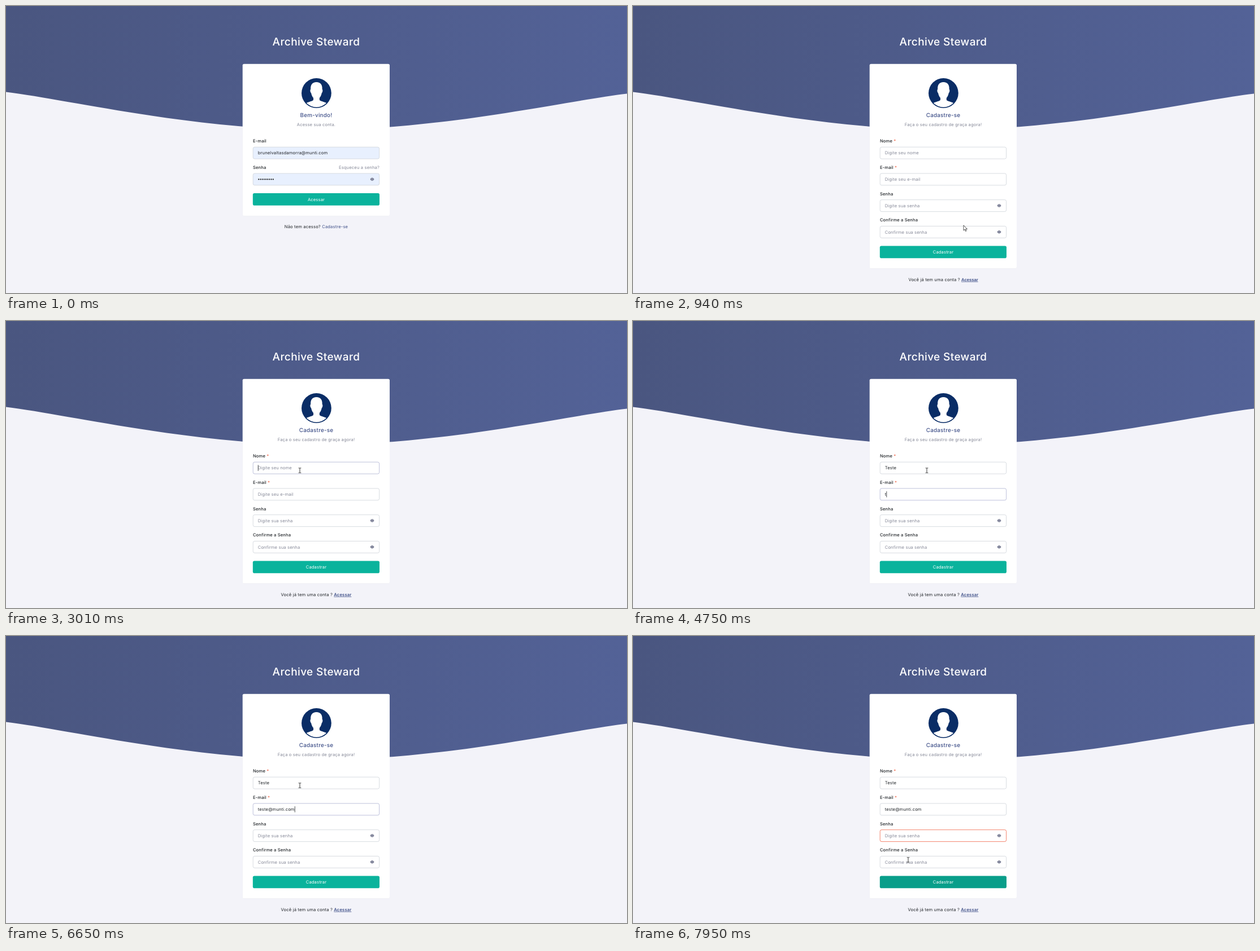
These frames come from a looping animation (1099x509 px, 8000 ms). An HTML page:

```html
<!DOCTYPE html>
<html lang="pt-BR">
<head>
<meta charset="utf-8">
<title>Cadastro</title>
<style>
  html, body { margin: 0; width: 100%; height: 100%; overflow: hidden; background: #f3f3f9; }
  svg { display: block; width: 1099px; height: 509px; }
  text {
    font: 400 7.6px Inter, "Open Sans", sans-serif;
    letter-spacing: .02em;
    text-rendering: geometricPrecision;
    fill: #212529;
    white-space: pre;
  }
  .mid { text-anchor: middle; }
  .end { text-anchor: end; }
  .brand { font-size: 19px; font-weight: 500; fill: #fff; }
  .heading { font-size: 9.9px; font-weight: 500; fill: #405189; }
  .muted { fill: #878a99; }
  .label { font-weight: 500; }
  .star { fill: #f06548; }
  .light { fill: #fff; }
  .link { fill: #405189; }
  .strong { font-weight: 600; text-decoration: underline; }
  .fallback { font-family: "Liberation Sans", Arial, sans-serif; font-weight: 700; letter-spacing: 0; }
  .card { fill: #fff; filter: drop-shadow(0 .8px .7px rgba(56, 65, 74, .15)); }
  .field { fill: #fff; stroke: #ced4da; stroke-width: .8; }
  .filled { fill: #e8f0fe; }
  .button { fill: #0ab39c; }
</style>
</head>
<body>
<svg viewBox="0 0 1099 509">
  <defs>
    <linearGradient id="sky">
      <stop offset="0" stop-color="#4a5680"/>
      <stop offset="1" stop-color="#536297"/>
    </linearGradient>
    <g id="eye">
      <path d="M-3.4 0C-2.4-1.9-1.2-2.7 0-2.7S2.4-1.9 3.4 0C2.4 1.9 1.2 2.7 0 2.7S-2.4 1.9-3.4 0Z" fill="#5b607c"/>
      <circle r="1.55" fill="none" stroke="#fff" stroke-width=".55"/>
    </g>
  </defs>

  <rect width="1099" height="217" fill="url(#sky)"/>
  <path transform="translate(0 125) scale(.7632)" fill="#f3f3f9"
    d="M0 36C144 53.6 432 123.2 720 124C1008 124.8 1296 56.8 1440 40V140H0Z"/>
  <text class="brand mid" x="549" y="70.3">Archive Steward</text>
  <rect id="card" class="card" x="418.7" y="102.7" width="260.3" height="269.5" rx="2.6"/>

  <g transform="translate(549.4 154.5)">
    <circle r="26.4" fill="#0a2d66"/>
    <path fill="#fff" d="M0-19.5C7.5-19.5 10.6-14.5 10.2-7C11.6-5.5 11 -1.5 9.3 0C8.6 4 7 6.8 5.4 8.5V12C7 14.6 13.5 15.2 17.7 17.6
      A25 25 0 0 1-17.7 17.6C-13.5 15.2-7 14.6-5.4 12V8.5C-7 6.8-8.6 4-9.3 0C-11-1.5-11.6-5.5-10.2-7C-10.6-14.5-7.5-19.5 0-19.5Z"/>
  </g>

  <g id="login"></g>
  <g id="signup"></g>
  <rect id="caret" width=".8" height="10.6" fill="#212529"/>

  <g id="pointer">
    <path id="arrow" d="M0 0V9.3L2.1 7.3L3.6 10.7L5 10.1L3.6 6.8H6.5Z" fill="#fff" stroke="#111" stroke-width=".7"/>
    <path id="beam" d="M-2.3-4.2H-.6L0-3.8L.6-4.2H2.3M0-3.8V3.8M-2.3 4.2H-.6L0 3.8L.6 4.2H2.3" fill="none" stroke="#222" stroke-width=".9"/>
    <path id="hand" d="M-1 .8C-1-.4 .9-.4 .9 .8V4.3C1.5 3.7 2.6 3.9 2.7 4.8C3.3 4.3 4.3 4.6 4.4 5.4C5.1 5 6 5.5 6 6.3V9.4C6 11 5.2 11.8 5 13.4H-.4C-.7 11.5-2.5 9.9-3.4 8C-3.7 7-2.6 6.5-1.9 7.3L-1 8.4Z"
      fill="#fff" stroke="#111" stroke-width=".8" stroke-linejoin="round"/>
  </g>
</svg>

<script>
const $ = id => document.getElementById(id);
const ROW = 46.75, LEFT = 437.2, WIDTH = 223.4;
const MAIL = 'teste@munti.com';

const text = (x, y, cls, body, id = '') => `<text ${id && `id="${id}"`} x="${x}" y="${y}" class="${cls}">${body}</text>`;
const required = name => `${name} <tspan class="star">*</tspan>`;
const eye = row => `<use href="#eye" x="648" y="${307.2 + ROW * (row - 1)}"/>`;

function field(row, label, body, { id = '', cls = '', tone = 'muted' } = {}) {
  const y = ROW * row;
  return text(LEFT - .3, 242 + y, 'label', label)
    + `<rect ${id && `id="${id}Box"`} class="field ${cls}" x="${LEFT}" y="${250.2 + y}" width="${WIDTH}" height="20.9" rx="2.8"/>`
    + text(445.7, 263.3 + y, tone, body, id);
}
const heading = (title, note) => text(549, 197, 'heading mid', title) + text(549, 212.6, 'muted mid', note);
const button = (y, label, id) =>
  `<rect id="${id}" class="button" x="436.8" y="${y}" width="224.2" height="21.8" rx="2.8"/>` + text(549, y + 13.6, 'light mid', label);

const dots = Array.from({ length: 9 }, (_, i) => `<circle cx="${447.2 + 3.2 * i}" cy="307.4" r="1.05" fill="#111"/>`).join('');

$('login').innerHTML = heading('Bem-vindo!', 'Acesse sua conta.')
  + field(0, 'E-mail', 'brunelvaltasdamorra@munti.com', { cls: 'filled', tone: '' })
  + field(1, 'Senha', '', { cls: 'filled' }) + dots + eye(1)
  + text(661, 288.7, 'muted end', 'Esqueceu a senha?')
  + button(331.9, 'Acessar', 'enter')
  + text(549, 394.4, 'mid', 'Não tem acesso? <tspan class="link">Cadastre-se</tspan>');

$('signup').innerHTML = heading('Cadastre-se', 'Faça o seu cadastro de graça agora!')
  + field(0, required('Nome'), '', { id: 'name' })
  + field(1, required('E-mail'), '', { id: 'mail' })
  + field(2, 'Senha', 'Digite sua senha', { id: 'pass' }) + eye(2)
  + field(3, 'Confirme a Senha', 'Confirme sua senha') + eye(3)
  + button(425.4, 'Cadastrar', 'send')
  + text(549, 487.7, 'mid', 'Você já tem uma conta ? <tspan id="back" class="link strong">Acessar</tspan>');

const nameKeys = [3090, 3420, 3550, 3680, 3820];
const mailKeys = [4750, 4880, 5010, 5140, 5270, 5470, 5740, 5840, 5930, 6060, 6130, 6330, 6440, 6540, 6650];

// time, x, y
const path = [
  [70, 1000, 491], [330, 800, 436], [600, 622, 394], [730, 586, 384], [870, 585, 389],
  [1270, 585, 388], [1540, 548, 322], [1820, 520, 265],
  [7080, 520, 265], [7180, 517, 272], [7350, 497, 356], [7550, 486, 431],
  [7680, 486, 438], [7820, 487, 432], [7880, 487, 425], [7950, 487, 393]
];

const clamp = v => Math.min(1, Math.max(0, v));
const ramp = (t, from, to) => clamp((t - from) / (to - from));
const mix = (a, b, k) => `rgb(${a.map((v, i) => Math.round(v + (b[i] - v) * k))})`;
const typed = (word, keys, t) => word.slice(0, keys.filter(k => k <= t).length);
const show = (node, on) => { node.style.display = on ? '' : 'none'; };

function pointerAt(t) {
  const next = path.findIndex(p => p[0] > t);
  if (next < 0) return path.at(-1).slice(1);
  const a = path[Math.max(0, next - 1)], b = path[next];
  const k = ramp(t, a[0], b[0]);
  return [a[1] + (b[1] - a[1]) * k, a[2] + (b[2] - a[2]) * k];
}

function pointerKind(x, y, signup) {
  if (!signup) return x > 558 && x < 606 && y > 385 && y < 398 ? 'hand' : 'arrow';
  if (x < 437 || x > 661) return 'arrow';
  if (y >= 425 && y < 447) return 'hand';
  const offset = y - 250;
  return y < 412 && offset >= 0 && offset % ROW < 21.3 ? 'beam' : 'arrow';
}

function drawPointer(t, signup) {
  const [x, y] = pointerAt(Math.floor((t + 6) / 67.3) * 67.3);
  const kind = pointerKind(x, y, signup);
  show($('pointer'), t >= 70);
  $('pointer').setAttribute('transform', `translate(${x} ${y})`);
  for (const id of ['arrow', 'beam', 'hand']) show($(id), id === kind);
}

function drawField(id, value, placeholder) {
  const node = $(id);
  node.textContent = value || placeholder;
  node.setAttribute('class', value ? '' : 'muted');
}

function drawCaret(t, name, mail) {
  const inMail = t >= 4210;
  const lastKey = [2020, 4210, ...nameKeys, ...mailKeys].filter(k => k <= t).reduce((a, b) => Math.max(a, b), 0);
  const on = t >= 2020 && t < 7880 && (t - lastKey + 10) % 1000 < 510;
  const value = inMail ? mail : name;
  const width = value ? $(inMail ? 'mail' : 'name').getComputedTextLength() : 0;
  show($('caret'), on);
  $('caret').setAttribute('x', 445.8 + width);
  $('caret').setAttribute('y', 255.3 + (inMail ? ROW : 0));
}

const idle = [206, 212, 218], focus = [174, 178, 210], error = [240, 101, 72];
const border = (id, to, k) => { $(id).style.stroke = mix(idle, to, k); };

function draw(t) {
  const signup = t >= 940;
  show($('login'), !signup);
  show($('signup'), signup);
  $('card').setAttribute('height', signup ? 362.6 : 269.5);
  $('back').setAttribute('class', 'link strong' + (t < 1010 ? ' fallback' : ''));

  const name = typed('Teste', nameKeys, t), mail = typed(MAIL, mailKeys, t);
  drawField('name', name, 'Digite seu nome');
  drawField('mail', mail, 'Digite seu e-mail');
  border('nameBox', focus, ramp(t, 1960, 2090) - ramp(t, 4200, 4350));
  border('mailBox', focus, t >= 7940 ? 0 : ramp(t, 4200, 4350));
  border('passBox', error, t >= 7940 ? 1 : 0);
  $('send').style.fill = mix([10, 179, 156], [9, 158, 138], ramp(t, 7540, 7690));

  drawCaret(t, name, mail);
  drawPointer(t, signup);
}

const start = performance.now();
function tick(now) {
  draw(Math.max(0, now - start) % 8000);
  requestAnimationFrame(tick);
}
draw(0);
requestAnimationFrame(tick);
</script>
</body>
</html>
```
